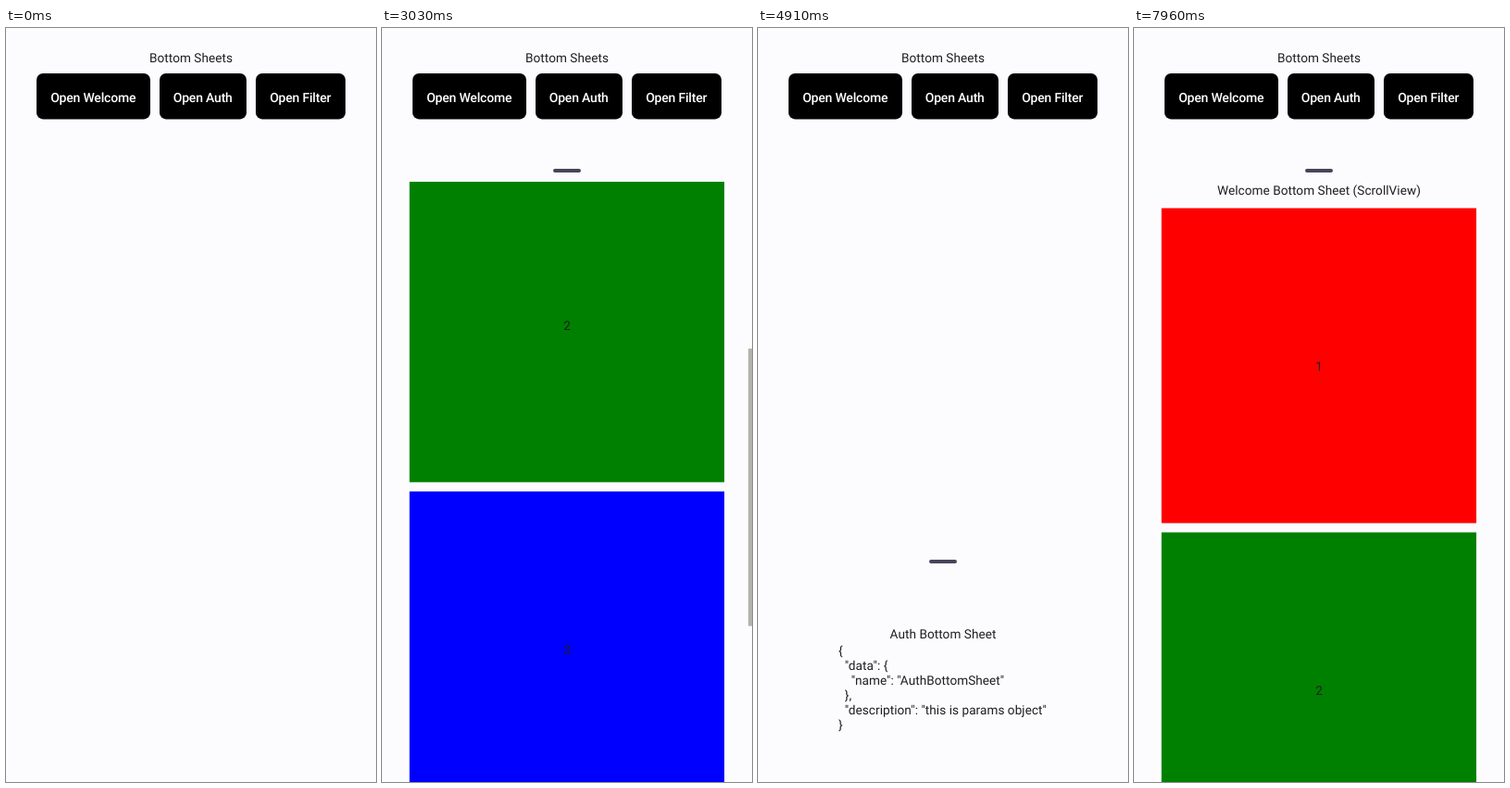
Animation of 400 by 814 pixels, one loop 8000 ms. Source, as an HTML page with a canvas:

```html
<!DOCTYPE html>
<html lang="en">
<head>
<meta charset="utf-8">
<title>Bottom Sheets</title>
<style>
  html, body { margin: 0; width: 100%; height: 100%; overflow: hidden; background: #fcfcff; }
  canvas { display: block; width: 400px; height: 814px; }
</style>
</head>
<body>
<canvas id="stage"></canvas>
<script>
const W = 400, H = 814, LOOP = 8000;
const STEP = 1000 / 24, PHASE = 12;
const BG = '#fcfcff', INK = '#1f1e22';
const canvas = document.getElementById('stage');
const ratio = window.devicePixelRatio || 1;
canvas.width = W * ratio;
canvas.height = H * ratio;
const ctx = canvas.getContext('2d');

const BUTTONS = [['Open Welcome', 33, 123], ['Open Auth', 166, 94], ['Open Filter', 270, 97]];
const TILES = ['#fe0000', '#008000', '#00f', '#ff0'];
const TILE = 340, PITCH = 350, MAX_SCROLL = 771;
const PARAMS = JSON.stringify({
  data: { name: 'AuthBottomSheet' },
  description: 'this is params object'
}, null, 2).split('\n');

// Each sheet rests at `top`; moves are [start, end, opens].
const SHEETS = [
  { top: 142, draw: drawWelcome, moves: [[1400, 1840, 1], [4590, 4900, 0], [7550, 7940, 1]] },
  { top: 564, draw: drawAuth, moves: [[4590, 4900, 1], [5750, 6190, 0]] },
  { top: 311, draw: drawFilter, moves: [[5750, 6190, 1], [7030, 7360, 0]] }
];

const progress = (t, a, b) => Math.min(1, Math.max(0, (t - a) / (b - a)));
const easeOut = u => 1 - (1 - u) ** 4;

// The screen refreshes 24 times a second.
const hold = t => Math.max(0, Math.floor((t + PHASE) / STEP) * STEP - PHASE);

function openness(t, moves) {
  let value = 0;
  for (const [a, b, opens] of moves) {
    if (t >= a) value += (opens - value) * easeOut(progress(t, a, b));
  }
  return value;
}

function scrollAt(t) {
  const down = progress(t, 2790, 3190) ** 1.31;
  const up = progress(t, 3420, 3860) ** 1.49;
  return MAX_SCROLL * (down - up);
}

function label(text, x, y, { color = INK, weight = 400, size = 13.62, spacing = 0.04, align = 'center' } = {}) {
  ctx.font = `${weight} ${size}px Roboto, sans-serif`;
  ctx.letterSpacing = `${spacing}px`;
  ctx.textRendering = 'geometricPrecision';
  ctx.textAlign = align;
  ctx.fillStyle = color;
  ctx.fillText(text, x, y);
}

function pill(x, y, w, h, r, color) {
  ctx.fillStyle = color;
  ctx.beginPath();
  ctx.roundRect(x, y, w, h, r);
  ctx.fill();
}

function drawPage() {
  ctx.fillStyle = BG;
  ctx.fillRect(0, 0, W, H);
  label('Bottom Sheets', 200, 37.3);
  for (const [text, x, w] of BUTTONS) {
    pill(x, 49, w, 49.4, 7, '#000');
    label(text, x + w / 2 - 0.3, 79.6, { color: '#fff', weight: 500, size: 14, spacing: -0.2 });
  }
}

function drawWelcome(top, t) {
  const scroll = scrollAt(t), view = top + 24;
  ctx.save();
  ctx.beginPath();
  ctx.rect(0, view, W, H);
  ctx.clip();
  label('Welcome Bottom Sheet (ScrollView)', 200, top + 38.3 - scroll);
  TILES.forEach((color, i) => {
    const y = top + 52.5 + i * PITCH - scroll;
    ctx.fillStyle = color;
    ctx.fillRect(29.7, y, TILE + 0.4, TILE);
    label(String(i + 1), 200, y + TILE / 2 + 5.2);
  });
  ctx.restore();

  if (t < 2800 || t >= 4330) return;
  ctx.globalAlpha = 1 - progress(t, 4110, 4320);
  ctx.fillStyle = '#b3b3ab';
  ctx.fillRect(396, view + scroll * 0.457, 4, 299.5);
  ctx.globalAlpha = 1;
}

function drawAuth(top) {
  label('Auth Bottom Sheet', 200, top + 94.7);
  PARAMS.forEach((line, i) => label(line, 87, top + 113 + i * 16, { align: 'left' }));
}

function drawFilter(top) {
  label('Filter Bottom Sheet', 200, top + 270);
}

function render(t) {
  ctx.setTransform(ratio, 0, 0, ratio, 0, 0);
  drawPage();
  for (const { top, draw, moves } of SHEETS) {
    const open = openness(t, moves);
    if (open < 0.0005) continue;
    const y = H + (top - H) * open;
    pill(0, y, W, H, [15, 15, 0, 0], BG);
    draw(y, t);
    pill(185, y + 10, 30, 4, 2, '#46455a');
  }
}

const start = performance.now();
function tick() {
  render(hold((performance.now() - start) % LOOP));
  requestAnimationFrame(tick);
}
tick();
</script>
</body>
</html>
```
